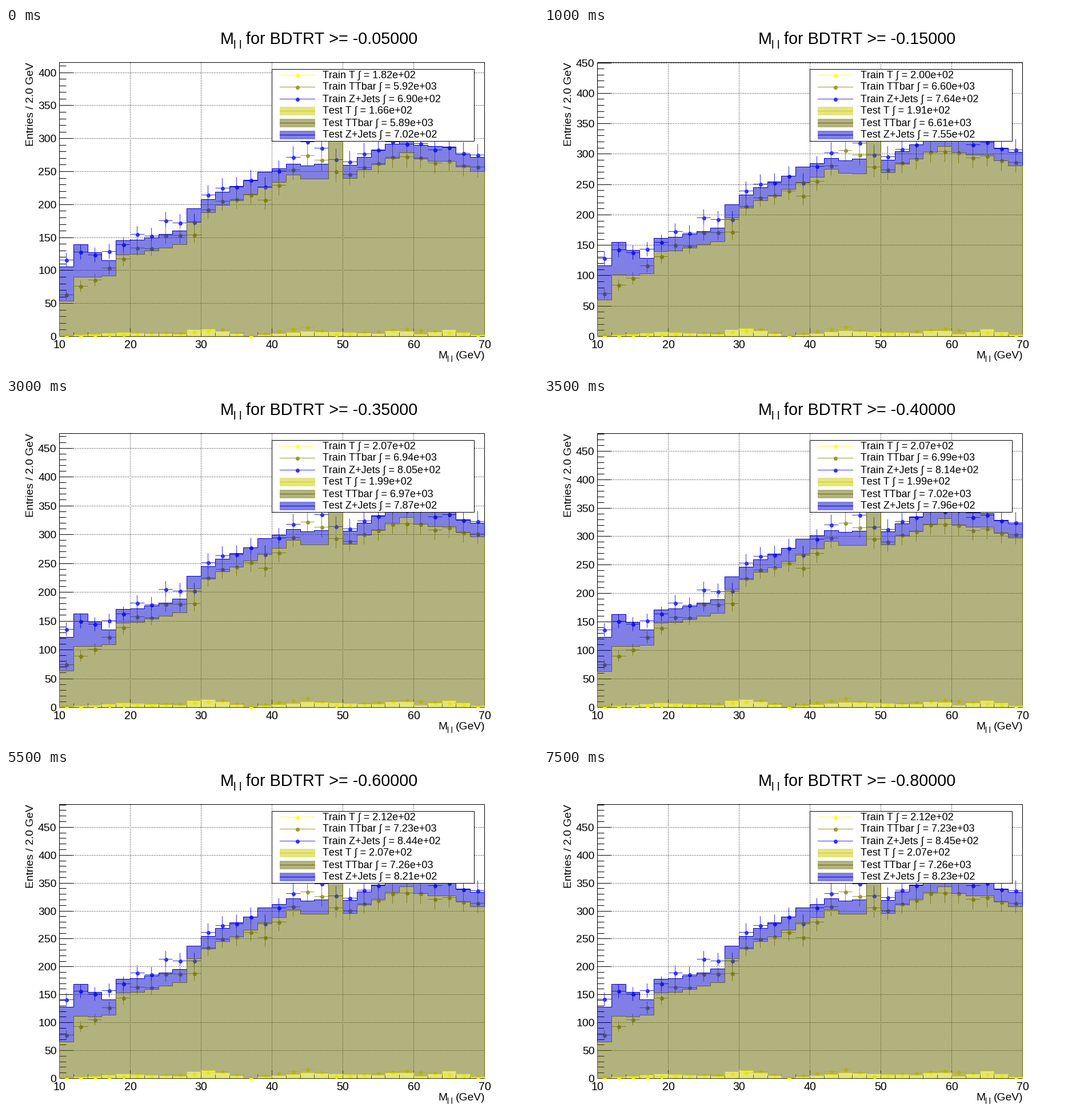
Animation, 931 px wide and 601 px high, one loop 8000 ms. Source, as a matplotlib script:

```python
import numpy as np
import matplotlib.pyplot as plt
from matplotlib.animation import ArtistAnimation
from matplotlib.patches import Rectangle

plt.rcParams["font.family"] = ["Liberation Sans", "DejaVu Sans"]
plt.rcParams["path.snap"] = False
plt.rcParams["text.kerning_factor"] = 6

W, H, DPI = 931, 601, 64
PT = 72 / DPI                      # points per pixel
STEPS, INTERVAL = 16, 500
LEFT, RIGHT, TOP, BASE = 93.5, 837.5, 60.5, 540.5
DOTTED = (0, (1, 2))

NAMES = ["T", "TTbar", "Z+Jets"]
POINTS = ["#ffff33", "#999930", "#3030ff"]
FILLS = ["#cccc00", "#666600", "#0000cc"]

# Event yields and axis maximum as the cut is loosened
KNOTS = [0, 2, 4, 7, 9, 11, 12]
Y_MAX = [415.3, 450.5, 464.5, 480.8, 488.1, 490.7, 490.7]
YIELDS = {
    "Train": [[182, 200, 207, 207, 211, 212, 212],
              [5920, 6600, 6830, 6990, 7150, 7230, 7230],
              [690, 764, 787, 814, 834, 844, 845]],
    "Test": [[166, 191, 198, 199, 205, 207, 207],
             [5890, 6610, 6860, 7020, 7170, 7260, 7260],
             [702, 755, 770, 796, 811, 821, 823]],
}

MASS = np.arange(11, 70, 2)
EDGES = LEFT + np.round(24.8 * np.arange(31))
MIDS = LEFT + np.round(24.8 * (np.arange(30) + 0.5))
rng = np.random.default_rng(4)


def shape(curve, spread):
    """Unit-area spectrum with a little statistical scatter."""
    bins = curve + spread * np.sqrt(curve) * rng.normal(size=MASS.size)
    return bins / bins.sum()


def through(masses, heights):
    return np.interp(MASS, masses, heights)


Z_CURVE = 24 + 39 * np.exp(-((MASS - 12) / 3.5) ** 2)
SHAPES = {
    "Train": [
        shape(through([11, 27, 33, 37, 45, 49, 59, 69],
                      [2, 7, 13, 1, 18, 4, 14, 3]), 0),
        shape(through([11, 15, 21, 23, 25, 29, 31, 37, 39, 45, 51, 57, 69],
                      [76, 104, 157, 155, 183, 180, 222, 262, 249, 318, 295, 321, 310]), 0.15),
        shape(Z_CURVE, 0.3)],
    "Test": [
        shape(through([11, 19, 27, 30, 37, 45, 55, 58, 61, 65, 69],
                      [1, 8, 4, 17, 1, 10, 6, 13, 4, 13, 3]), 0),
        shape(through([11, 13, 17, 19, 27, 29, 37, 43, 47, 49, 51, 59, 69],
                      [63, 109, 104, 142, 165, 203, 264, 298, 287, 370, 292, 335, 305]), 0.15),
        shape(Z_CURVE, 0.3)],
}

fig = plt.figure(figsize=(W / DPI, H / DPI), dpi=DPI, facecolor="white")
ax = fig.add_axes([0, 0, 1, 1])
ax.set(xlim=(0, W), ylim=(H, 0))
ax.axis("off")


def text(x, y, s, size, **kw):
    return ax.text(x, y, s, size=size * PT, va="baseline", zorder=7, **kw)


def hlines(y, x0, x1, color="black", z=1, **kw):
    return ax.hlines(y, x0, x1, color=color, lw=PT, zorder=z, **kw)


def vlines(x, y0, y1, color="black", z=1, **kw):
    return ax.vlines(x, y0, y1, color=color, lw=PT, zorder=z, **kw)


def dots(x, y, color, z):
    return ax.plot(x, y, "o", color=color, ms=7 * PT, mew=0, zorder=z)[0]


def box(x0, y0, x1, y1, z, **kw):
    ax.add_patch(Rectangle((x0, y0), x1 - x0, y1 - y0, zorder=z, **kw))


def draw_fixed():
    box(LEFT, TOP, RIGHT, BASE, 1, fill=False, ec="black", lw=PT)
    for v in range(10, 71, 2):
        x = LEFT + round(12.4 * (v - 10))
        vlines(x, BASE - (14 if v % 10 == 0 else 7), BASE)
        if v % 10 == 0:
            text(x, 561, str(v), 19.6, ha="center")
            if 10 < v < 70:
                vlines(x, TOP + 0.5, BASE, linestyles=DOTTED)
    text(756.5, 579, "M", 19.3)
    text(772.5, 585, "l l", 13.5)
    text(787, 579, "(GeV)", 19.3)
    text(48.5, 60, "Entries / 2.0 GeV", 19.3, rotation=90,
         rotation_mode="anchor", ha="right")
    text(375, 28, "M", 28.8)
    text(398.5, 36, "l l", 20)

    box(465.5, 72.5, 819.5, 198.5, 5, fc="white", ec="black", lw=PT)
    for i in range(3):
        y = 82.5 + 21 * i
        hlines(y, 479, 541, POINTS[i], 6)
        dots([509.5], [y], POINTS[i], 6)
        y += 63
        box(479, y - 7.5, 541, y + 7.5, 6, fc=FILLS[i], alpha=0.5, lw=0)
        hlines(y, 479, 541, FILLS[i], 6)


def draw_axis(top, scale):
    art = []
    for v in range(0, int(top) + 1, 10):
        y = BASE - round(v * scale)
        major = v % 50 == 0
        art.append(hlines(y, LEFT, LEFT + (24 if major else 12)))
        if major:
            art.append(text(88.5, y + 6.5, str(v), 19.4, ha="right"))
            if v:
                art.append(hlines(y, LEFT + 0.5, RIGHT, linestyles=DOTTED))
    return art


def draw_points(vals, scale, color):
    y = BASE - np.round(vals * scale)
    err = np.sqrt(vals) * scale
    return [hlines(y, EDGES[:-1], EDGES[1:], color, 2),
            vlines(MIDS, y - err, np.minimum(y + err, BASE), color, 2),
            dots(MIDS, y, color, 2.1)]


def draw_hist(vals, below, scale, color):
    y = BASE - np.round(vals * scale)
    y0 = BASE - np.round(below * scale)
    return [ax.stairs(y, EDGES, baseline=y0, fill=True, color=color,
                      alpha=0.5, lw=0, zorder=3),
            ax.stairs(y, EDGES, baseline=BASE, color=color, lw=PT, zorder=4)]


def draw_step(step):
    top = np.interp(step, KNOTS, Y_MAX)
    scale = (BASE - TOP) / top
    art = draw_axis(top, scale)
    art.append(text(419.5, 28, f"for BDTRT >= {-0.05 * (step + 1):.5f}", 28.8))

    stack = {}
    for row, (kind, yields) in enumerate(YIELDS.items()):
        counts = [np.interp(step, KNOTS, n) for n in yields]
        bins = [n * s for n, s in zip(counts, SHAPES[kind])]
        stack[kind] = np.cumsum([np.zeros(30)] + bins, axis=0)
        for i, n in enumerate(counts):
            art.append(text(553.5, 87.5 + 63 * row + 21 * i,
                            f"{kind} {NAMES[i]} \u222b = {n:.2e}", 18))

    for i in (2, 1, 0):
        art += draw_points(stack["Train"][i + 1], scale, POINTS[i])
        art += draw_hist(stack["Test"][i + 1], stack["Test"][i], scale, FILLS[i])
    return art


draw_fixed()
anim = ArtistAnimation(fig, [draw_step(s) for s in range(STEPS)],
                       interval=INTERVAL, repeat=True, repeat_delay=0)
plt.show()
```
